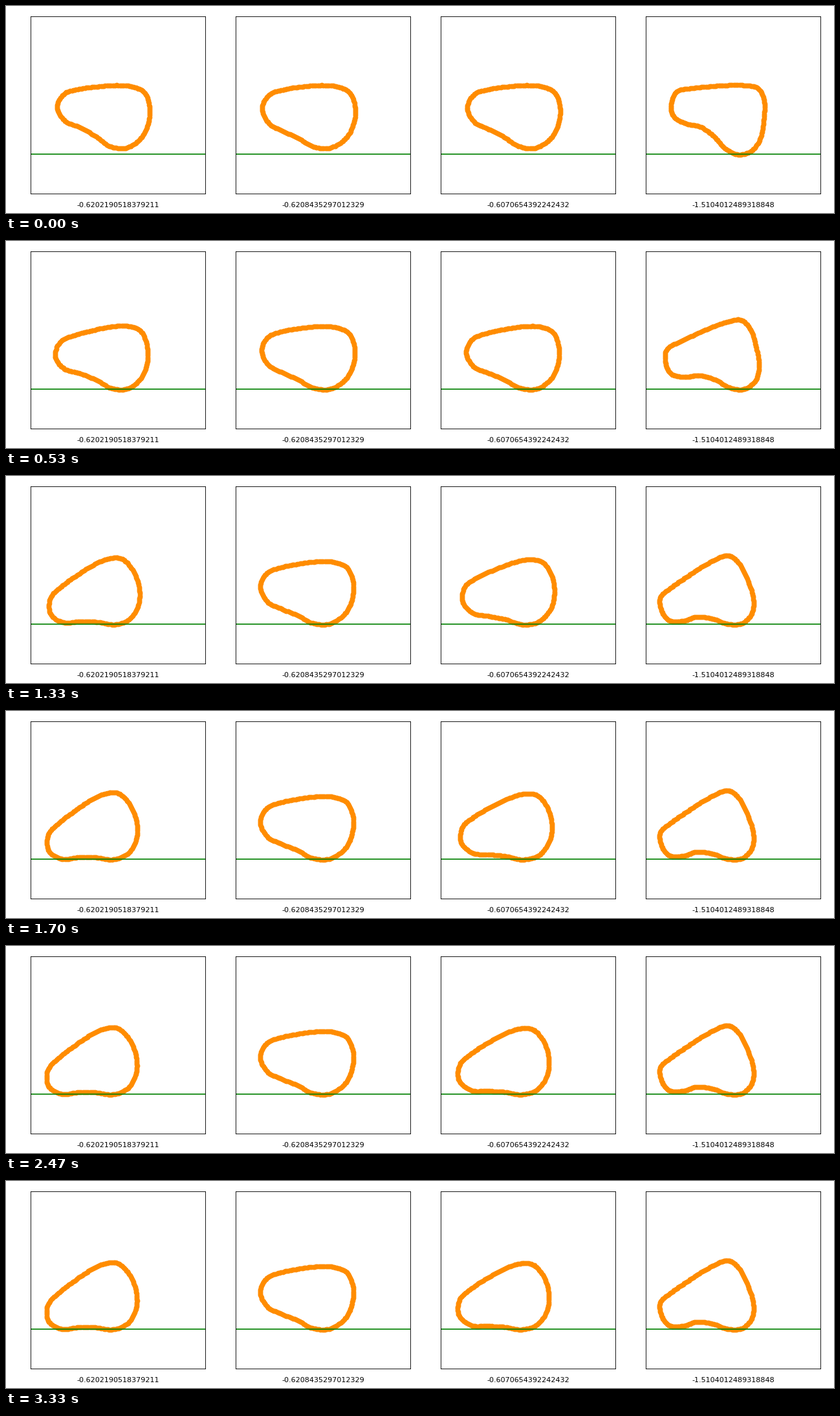
A matplotlib script for the animation above (3360 ms loop, 1280x320 px).

```python
import numpy as np
import matplotlib.pyplot as plt
from matplotlib.animation import FuncAnimation

W, H, DPI = 1280, 320, 80
LOOP_MS, FRAMES = 3360, 101
GROUND = 229                       # green line
FLOOR = 229.7                      # lowest point of a resting outline
DROP_MS = 150

# Key points of the outlines, clockwise from the left tip, in pixels.
DENTED = np.array([
    (79, 157), (90, 135.5), (115, 128), (142, 124.5), (169, 122.5),
    (195, 124.5), (215, 135), (222, 159), (219, 184), (207, 206),
    (185, 219.5), (160, 216.5), (138, 201), (115, 188), (91, 177.5)])
ROUND = np.array([
    (79, 158), (90, 137), (115, 128.5), (142, 124.5), (169, 122.5),
    (195, 124.5), (215, 135), (223, 159), (219.5, 184), (207, 206),
    (183, 219.5), (157, 217), (134, 204), (110, 193), (89, 181)])
HOOKED = np.array([
    (77, 155), (85, 133), (109, 127.5), (135, 125), (162, 123), (189, 123),
    (211, 127.3), (221, 147), (220.5, 174), (216, 202), (203, 223),
    (181, 230), (160, 220), (143, 201.5), (122, 187), (101, 182.5),
    (82, 172)])


def smooth(pts, per=12):
    """Closed Catmull-Rom curve through pts."""
    a, b, c, d = (np.roll(pts, k, axis=0)[:, None] for k in (1, 0, -1, -2))
    t = np.linspace(0, 1, per, endpoint=False)[None, :, None]
    curve = (2 * b + (c - a) * t + (2 * a - 5 * b + 4 * c - d) * t**2
             + (3 * b - a - 3 * c + d) * t**3) / 2
    return curve.reshape(-1, 2)


def turn(deg):
    c, s = np.cos(np.radians(deg)), np.sin(np.radians(deg))
    return np.array([[c, -s], [s, c]])


class Blob:
    """Soft outline that drops, then rolls over onto its left side."""

    def __init__(self, keys, angle, settle, shift, stretch=(0, 0)):
        self.shape = smooth(keys)
        x, y = self.shape.T
        self.mid = (x.min() + x.max()) / 2
        self.low = min(y.max(), FLOOR)
        self.start = DROP_MS if self.low < FLOOR - 1 else 0
        self.angle, self.settle, self.shift = angle, settle, shift
        self.stretch = np.array(stretch)

    def outline(self, ms):
        tilt = np.clip((ms - self.start) / (self.settle - self.start), 0, 1)
        tilt **= 1.1
        slide = min(1, ms / (1.36 * self.settle))
        slide = slide * slide * (3 - 2 * slide)
        fall = min(1, ms / (DROP_MS + 50)) ** 2

        pts = self.shape @ turn(self.angle * tilt) * (1 + self.stretch * tilt)
        x, y = pts.T
        x = x - (x.min() + x.max()) / 2 + self.mid + self.shift * slide
        y = y - y.max() + self.low + (FLOOR - self.low) * fall
        return np.column_stack([x, y])


blobs = {
    "-0.6202190518379211": Blob(DENTED, 29, 1400, -18, (0, 0.04)),
    "-0.6208435297012329": Blob(ROUND, 2.5, 1100, -3),
    "-0.6070654392242432": Blob((DENTED + ROUND) / 2, 24, 1870, -16,
                                (0, 0.025)),
    "-1.5104012489318848": Blob(HOOKED, 28.5, 720, -17.3, (-0.03, 0)),
}

fig, axes = plt.subplots(1, len(blobs), figsize=(W / DPI, H / DPI), dpi=DPI)
fig.tight_layout()
box = axes[0].get_position()

dots = []
for ax, label in zip(axes, blobs):
    # Every panel shares the pixel coordinates of the first one.
    ax.set_xlim(W * box.x0, W * box.x1)
    ax.set_ylim(H * (1 - box.y0), H * (1 - box.y1))
    ax.set_xticks([])
    ax.set_yticks([])
    ax.set_title(label, fontsize=10, y=-0.1)
    ax.axhline(GROUND, color="green")
    dots.append(ax.scatter([], [], color="darkorange"))


def update(i):
    ms = i * 100 / 3
    for dot, blob in zip(dots, blobs.values()):
        dot.set_offsets(blob.outline(ms))
    return dots


anim = FuncAnimation(fig, update, frames=FRAMES, interval=LOOP_MS / FRAMES,
                     repeat=True, repeat_delay=0)
plt.show()
```
